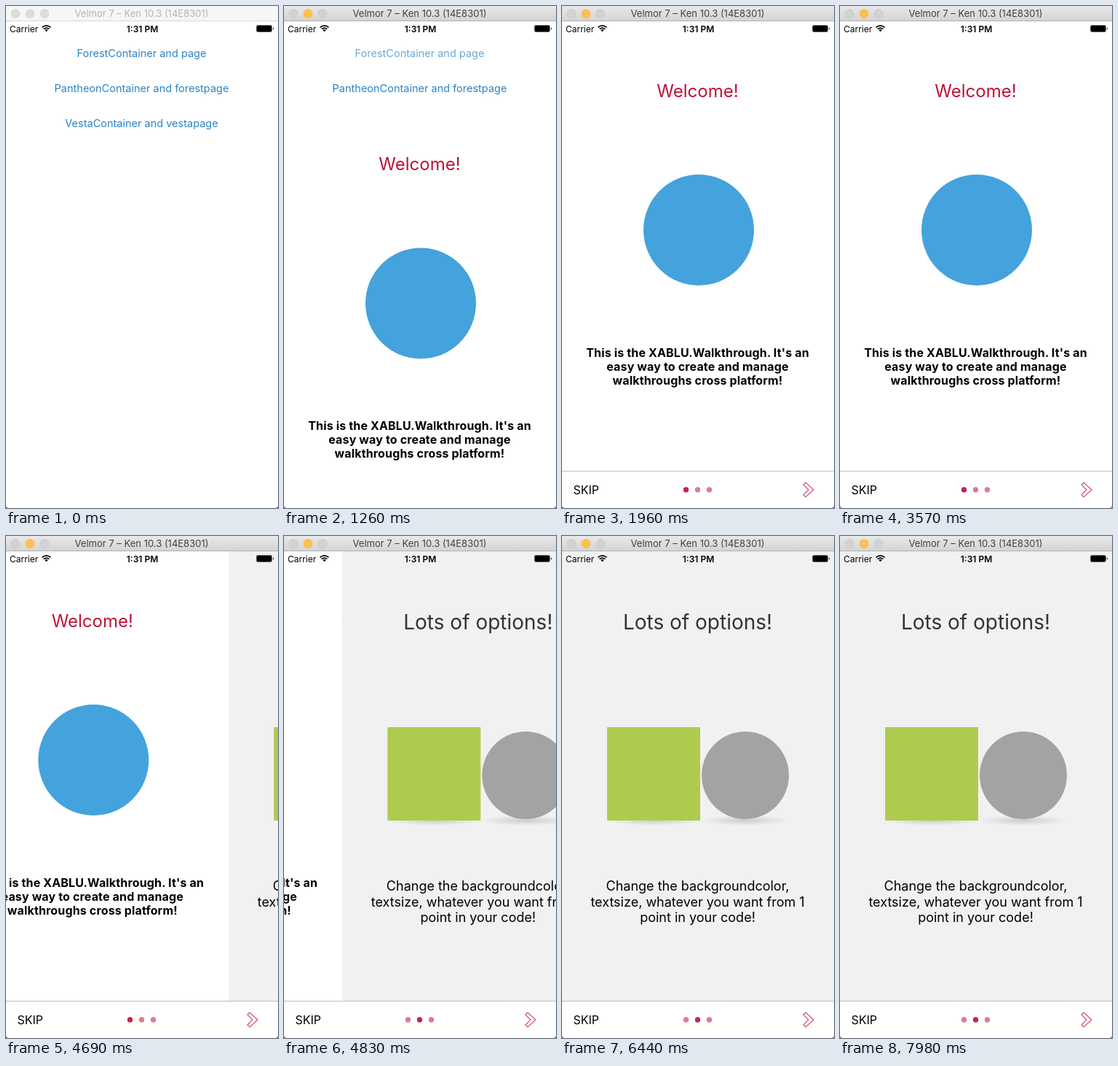
An HTML page that plays this animation: 374 by 688 pixels, repeating every 8 s.

```html
<!DOCTYPE html>
<html lang="en">
<head>
<meta charset="utf-8">
<title>Walkthrough</title>
<style>
  html, body { margin: 0; width: 100%; height: 100%; overflow: hidden; background: #fff; }
  svg { display: block; width: 374px; height: 688px; }
  text { font-family: Inter, "Open Sans", sans-serif; }
  .mid { text-anchor: middle; }
  .link { font-size: 14.5px; fill: #2b83c6; }
  .bold { font-size: 16px; font-weight: 700; letter-spacing: .15px; }
  .body { font-size: 18px; }
  .status { font-size: 12px; }
</style>
</head>
<body>
<svg viewBox="0 0 374 688">
  <defs>
    <linearGradient id="chrome" x2="0" y2="1">
      <stop stop-color="#e9e9e9"/><stop offset="1" stop-color="#d3d3d3"/>
    </linearGradient>
    <radialGradient id="shade">
      <stop stop-color="#ccc"/><stop offset="1" stop-color="#f1f1f1"/>
    </radialGradient>
  </defs>
  <rect width="374" height="688" fill="#fff"/>

  <g class="mid link">
    <text id="tapped" x="186.500" y="69.500">ForestContainer and page</text>
    <text x="186.500" y="117.500">PantheonContainer and forestpage</text>
    <text x="186.500" y="165.500">VestaContainer and vestapage</text>
  </g>

  <g id="modal">
    <g id="pages">
      <rect y="21" width="374" height="667" fill="#fff"/>
      <text class="mid" x="186.500" y="125" font-size="24" fill="#bd1139">Welcome!</text>
      <circle cx="188" cy="307" r="76" fill="#44a2dd"/>
      <g class="mid bold">
        <text x="186.500" y="480.500">This is the XABLU.Walkthrough. It's an</text>
        <text x="186.500" y="499.500">easy way to create and manage</text>
        <text x="186.500" y="518.500">walkthroughs cross platform!</text>
      </g>
      <g transform="translate(374)">
        <rect y="21" width="374" height="667" fill="#f1f1f1"/>
        <text class="mid" x="186.500" y="128" font-size="28" fill="#333">Lots of options!</text>
        <ellipse cx="127" cy="390" rx="64" ry="7" fill="url(#shade)"/>
        <ellipse cx="252" cy="390" rx="62" ry="7" fill="url(#shade)"/>
        <rect x="62" y="262" width="128" height="128" fill="#aecb4f"/>
        <circle cx="252" cy="328" r="60" fill="#a3a3a3"/>
        <g class="mid body">
          <text x="186.500" y="486">Change the backgroundcolor,</text>
          <text x="186.500" y="507.500">textsize, whatever you want from 1</text>
          <text x="186.500" y="528.500">point in your code!</text>
        </g>
      </g>
    </g>
    <rect y="637" width="374" height="51" fill="#fff"/>
    <path d="M0 637.500H374" stroke="#bcbcbc"/>
    <text x="15.500" y="668.500" font-size="16">SKIP</text>
    <g id="dots">
      <circle cx="170.500" cy="663" r="3.700"/>
      <circle cx="186.500" cy="663" r="3.700"/>
      <circle cx="202.500" cy="663" r="3.700"/>
    </g>
    <path d="M332 656L335 653L346 663L335 673L332 670L339 663Z" fill="none" stroke="#d0506f" stroke-width="1.200"/>
  </g>

  <g class="status">
    <text x="5" y="35.500">Carrier</text>
    <text class="mid" x="187.500" y="35.500" font-weight="600">1:31 PM</text>
    <g fill="none" stroke="#000" stroke-width="1.700">
      <path d="M49.500 29.300Q55.500 24.300 61.500 29.300M51.700 31.700Q55.500 28.500 59.300 31.700"/>
      <path d="M53.300 32.900L55.500 35.300L57.700 32.900Q55.500 31.300 53.300 32.900Z" fill="#000" stroke="none"/>
    </g>
    <rect x="344.500" y="26.500" width="21" height="9" rx="2" stroke="#666"/>
    <path d="M367 29.200Q369 31 367 32.800Z"/>
  </g>

  <rect id="bar" width="374" height="21"/>
  <path id="rule" d="M0 20.500H374"/>
  <g id="lights" stroke-width=".7">
    <circle cx="13" cy="10.500" r="6"/>
    <circle cx="33" cy="10.500" r="6"/>
    <circle cx="53" cy="10.500" r="6"/>
  </g>
  <text id="title" class="mid" x="186.500" y="15" font-size="13">Velmor 7 – Ken 10.3 (14E8301)</text>
  <path d="M0 684Q0 688 4 688H0ZM374 684Q374 688 370 688H374Z" fill="#666"/>
</svg>

<script>
const LOOP = 8000, FOCUS = 630, PRESS = 980, OPEN = 1077;
const DRAG = 4410, RELEASE = 4760, SETTLE = 4990;
const $ = id => document.getElementById(id);
const clamp = v => Math.max(0, Math.min(1, v));
const set = (el, attrs) => { for (const k in attrs) el.setAttribute(k, attrs[k]); };

// Distance of the modal below its resting place: critically damped spring
function drop(t) {
  const s = Math.max(0, t - OPEN) * 0.0183;
  return 667 * (1 + s) * Math.exp(-s);
}

// Finger drag, then the page snaps into place
function swipe(t) {
  const drag = u => 67 * Math.max(0, (u - DRAG) / 280) ** 3;
  if (t < RELEASE) return drag(t);
  const from = drag(RELEASE);
  const left = 1 - clamp((t - RELEASE) / (SETTLE - RELEASE));
  return 374 - (374 - from) * left ** 3;
}

function draw(t) {
  const active = t >= FOCUS, x = swipe(t), page = Math.round(x / 374);
  set($("bar"), { fill: active ? "url(#chrome)" : "#f6f6f6" });
  set($("rule"), { stroke: active ? "#b3b3b3" : "#d8d8d8" });
  set($("title"), { fill: active ? "#404040" : "#b4b4b4" });
  [...$("lights").children].forEach((c, i) => {
    const amber = active && i === 1;
    set(c, {
      fill: amber ? "#fdc04c" : active ? "#d2d2d2" : "#dcdcdc",
      stroke: amber ? "#f5b548" : active ? "#c4c4c4" : "#d4d4d4"
    });
  });

  const fade = clamp((t - OPEN) / 470);
  set($("tapped"), { opacity: t < PRESS ? 1 : 0.2 + 0.8 * (1 - (1 - fade) ** 2) });
  set($("modal"), { transform: `translate(0 ${drop(t)})` });
  set($("pages"), { transform: `translate(${-x})` });
  [...$("dots").children].forEach((c, i) => set(c, { fill: i === page ? "#c4264a" : "#da7d94" }));
}

const start = performance.now();
function tick() {
  draw((performance.now() - start) % LOOP);
  requestAnimationFrame(tick);
}
tick();
</script>
</body>
</html>
```
